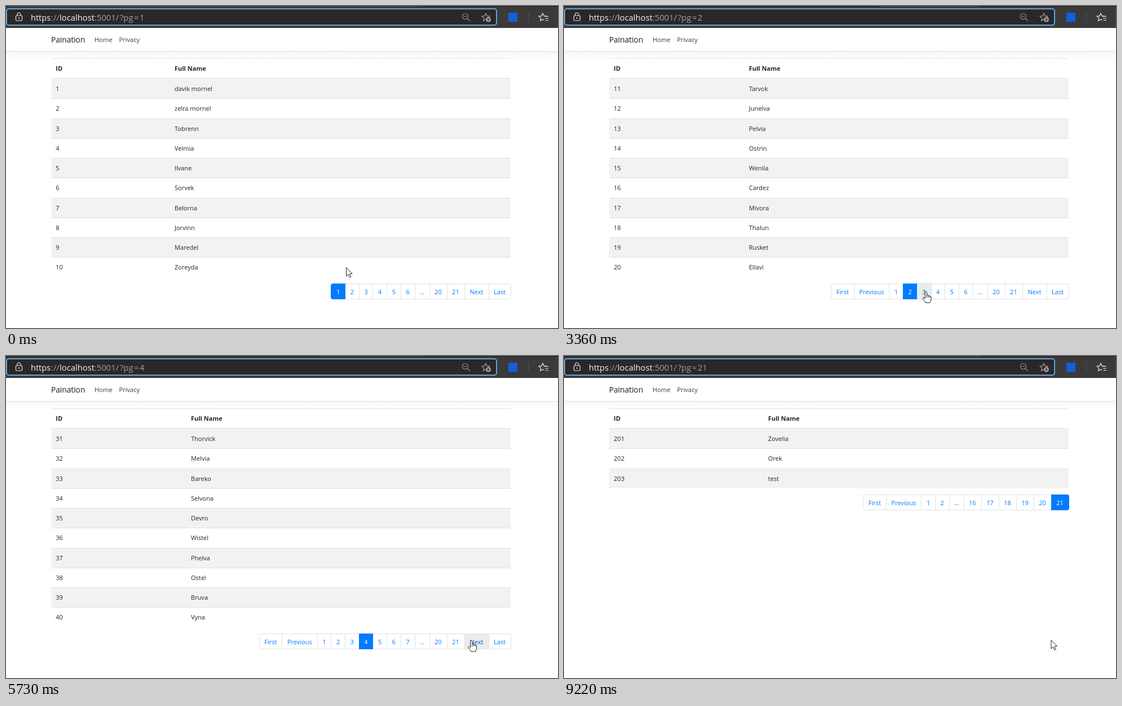
Animation, 979 px wide and 572 px high, one loop 9270 ms. Source, as an HTML page with a canvas:

```html
<!DOCTYPE html>
<html lang="en">
<head>
<meta charset="utf-8">
<title>Pagination</title>
<style>
html, body { margin: 0; width: 100%; height: 100%; overflow: hidden; background: #fff; }
canvas { display: block; }
</style>
</head>
<body>
<canvas id="stage" width="979" height="572"></canvas>
<script>
const ctx = document.getElementById('stage').getContext('2d');
const LOOP = 9270;
const FONT = '"Open Sans", "Noto Sans", sans-serif';
const LEFT = 80, RIGHT = 895, ROW = 35.27;
const BORDER = '#dee2e6', BLUE = '#007bff', INK = '#212529';

// load: content appears, wake: hover reacts again, click: link pressed, url: address of this page
const pages = [
  { no: 1, url: 0, load: 0, wake: 0, click: 1490, hit: '2', nameX: 299, first: 1,
    links: '1 2 3 4 5 6 ... 20 21 Next Last',
    names: 'davik mornel,zelra mornel,Tobrenn,Velmia,Ilvane,Sorvek,Belorna,Jorvinn,Maredel,Zoreyda' },
  { no: 2, url: 2520, load: 3010, wake: 3050, click: 3360, hit: '3', nameX: 328, first: 11,
    links: 'First Previous 1 2 3 4 5 6 ... 20 21 Next Last',
    names: 'Tarvok,Junelva,Pelvia,Ostrin,Wenlia,Cardez,Mivora,Thalun,Rusket,Ellavi' },
  { no: 3, url: 3700, load: 4030, wake: 4060, click: 4350, hit: '4', nameX: 328, first: 21,
    links: 'First Previous 1 2 3 4 5 6 ... 20 21 Next Last',
    names: 'Fovin,Tovrin,Corvanda,Neza,Vemor,Tulso,Uvo,Zeln,Pelun,Drusk' },
  { no: 4, url: 4540, load: 4810, wake: 4840, click: 6030, hit: 'Next', nameX: 328, first: 31,
    links: 'First Previous 1 2 3 4 5 6 7 ... 20 21 Next Last',
    names: 'Thorvick,Melvia,Bareko,Selvona,Devro,Wistel,Phelva,Ostel,Bruva,Vyna' },
  { no: 5, url: 6210, load: 6500, wake: 6640, click: 6960, hit: 'Next', nameX: 328, first: 41,
    links: 'First Previous 2 3 4 5 6 7 8 ... 20 21 Next Last',
    names: 'Torvian,Yelva,Keldorn,Faskell,Clusk,Ovessia,Garvex,Umelia,Bramox,Holvik' },
  { no: 6, url: 7290, load: 7570, wake: 7790, click: 8400, hit: 'Last', nameX: 318, first: 51,
    links: 'First Previous 1 2 ... 3 4 5 6 7 8 9 ... 20 21 Next Last',
    names: 'Teluna,Mastren,Velorn,Bartholvern,Jorem,Ulo,Maliva,Treff,Wivone,Tosel' },
  { no: 21, url: 8680, load: 8940, wake: 9120, click: Infinity, hit: '', nameX: 362, first: 201,
    links: 'First Previous 1 2 ... 16 17 18 19 20 21',
    names: 'Zovelia,Orek,test' }
];

// pointer path: time, x, y
const path = [
  [0, 603, 464], [400, 603, 464], [1110, 613, 500], [1920, 613, 500], [2200, 637, 504],
  [2350, 640, 506], [2769, 640, 506], [2770, 642, 507], [3420, 642, 507], [3750, 660, 507],
  [3889, 660, 507], [3890, 663, 507], [4030, 663, 507], [4250, 666.5, 507], [4840, 666.5, 507],
  [5360, 809, 506], [5570, 809, 506], [5730, 825.5, 505], [5830, 829, 505], [6640, 829, 505],
  [6730, 829.5, 506], [7790, 829.5, 506], [8020, 860.5, 506.5], [8220, 869, 505],
  [9120, 869, 505], [9220, 863.5, 504], [LOOP, 863.5, 504]
];

const arrowShape = new Path2D('M.5 .5V16L4 12.7L6.3 18L8.8 17L6.5 11.8L11 11.3Z');
const handShape = new Path2D('M-1.6 1.8C-1.6 0 1.6 0 1.6 1.8V7.2C2 6 4.4 6.3 4.4 8C5 7 7 7.3 7 9' +
  'C7.6 8.2 9 8.7 9 10.4V14C9 17 7.4 17.6 7.2 20H-1C-1.6 17.6-4.5 15-5.6 12.6C-6.2 11-4.2 10-3 11.4L-1.6 13Z');
const knuckles = new Path2D('M1.6 7V11M4.4 8V11M7 9V11');
const starShape = new Path2D('M0-7L2.1-2.4L7-1.9L3.3 1.4L4.4 6.3L0 3.8L-4.4 6.3L-3.3 1.4L-7-1.9L-2.1-2.4Z');

function text(str, x, y, size = 11, color = INK, weight = 400, align = 'left') {
  ctx.font = `${weight} ${size}px ${FONT}`;
  ctx.textAlign = align;
  ctx.fillStyle = color;
  ctx.fillText(str, x, y);
}

function rect(x, y, w, h, color) {
  ctx.fillStyle = color;
  ctx.fillRect(x, y, w, h);
}

function rounded(x, y, w, h, r) {
  ctx.beginPath();
  ctx.roundRect(x, y, w, h, r);
}

function icon(x, y, color, draw) {
  ctx.save();
  ctx.translate(x, y);
  ctx.strokeStyle = ctx.fillStyle = color;
  ctx.lineWidth = 1.2;
  ctx.beginPath();
  draw();
  ctx.restore();
}

function line(...pts) {
  for (let i = 0; i < pts.length; i += 4) {
    ctx.moveTo(pts[i], pts[i + 1]);
    ctx.lineTo(pts[i + 2], pts[i + 3]);
  }
}

function pointerAt(t) {
  const i = path.findIndex(k => k[0] > t);
  const [t0, x0, y0] = path[i - 1], [t1, x1, y1] = path[i];
  const f = (t - t0) / (t1 - t0);
  return { x: x0 + (x1 - x0) * f, y: y0 + (y1 - y0) * f };
}

function drawToolbar(t) {
  rect(0, 0, 979, 39, '#3b3a3b');
  if (t >= 30) {
    rect(0, 0, 560, 1, '#1c1b1c');
  }
  rect(738, 0, 241, 1, '#1c1b1c');
  rounded(1, 5, 869, 29, 4);
  ctx.fillStyle = '#2b2728';
  ctx.fill();
  ctx.strokeStyle = '#5ba7e0';
  ctx.lineWidth = 2;
  ctx.stroke();

  icon(23, 20, '#e8e8e8', () => {
    ctx.roundRect(-5.5, -3, 11, 9, 1.5);
    ctx.moveTo(-3, -3);
    ctx.lineTo(-3, -5);
    ctx.arc(0, -5, 3, Math.PI, 0);
    ctx.lineTo(3, -3);
    ctx.stroke();
    ctx.fillRect(-1, .5, 2, 2);
  });

  const no = pages.findLast(p => t >= p.url).no;
  const dim = '#a3a0a1', lit = '#f4f4f4';
  text('https', 44, 26, 14.6, lit);
  text('://', 80, 26, 14.8, dim);
  text('localhost', 95, 26, 14.8, lit);
  text(':5001/', 157, 26, 14.8, dim);
  text('?pg', 202, 26, 14.8, dim);
  text('=', 227, 26, 14.8, dim);
  text(no, 237, 26, 14.8, dim);

  icon(816, 20, '#8f8c8d', () => {
    ctx.arc(-1.5, -1.5, 5, 0, 7);
    line(2.2, 2.2, 7, 7, -4, -1.5, 1, -1.5);
    ctx.stroke();
  });
  icon(851, 20, '#a09d9e', () => {
    ctx.stroke(starShape);
    ctx.arc(4.5, 4, 4.5, 0, 7);
    ctx.fill();
    ctx.strokeStyle = '#2b2728';
    ctx.beginPath();
    line(2, 4, 7, 4, 4.5, 1.5, 4.5, 6.5);
    ctx.stroke();
  });
  rect(891, 12, 16, 16, '#175ddc');
  rect(926, 12, 1, 16, '#555354');
  icon(952, 20, '#e6e6e6', () => {
    ctx.stroke(starShape);
    ctx.fillStyle = '#3b3a3b';
    ctx.fillRect(2.5, -1.5, 8, 9);
    line(3, -1.5, 10, -1.5, 4, 2, 10, 2, 5, 5.5, 10, 5.5);
    ctx.stroke();
  });
}

function drawNav() {
  const shade = ctx.createLinearGradient(0, 81, 0, 95);
  shade.addColorStop(0, 'rgba(0,0,0,.035)');
  shade.addColorStop(1, 'rgba(0,0,0,0)');
  rect(0, 81, 979, 14, shade);
  rect(0, 80, 979, 1, BORDER);
  text('Paination', 80, 65, 13.7, '#1a1a1a');
  text('Home', 157, 64, 11.2, '#343a40');
  text('Privacy', 200.5, 64, 11.1, '#343a40');
}

function drawTable(page) {
  const w = RIGHT - LEFT;
  rect(LEFT, 93, w, 1, BORDER);
  text('ID', 88.3, 115, 11, INK, 700);
  text('Full Name', page.nameX, 115, 11, INK, 700);
  const names = page.names.split(',');
  const top = i => Math.round(129 + ROW * i);
  names.forEach((name, i) => {
    if (i % 2 === 0) rect(LEFT, top(i), w, top(i + 1) - top(i), '#f2f2f2');
    rect(LEFT, i ? top(i) : 128, w, 1, BORDER);
    const y = Math.round(151 + ROW * i);
    text(page.first + i, 88.3, y);
    text(name, page.nameX, y);
  });
  return top(names.length) + 11;
}

function layout(page) {
  const fixed = { First: 40.5, Previous: 62.4, Next: 43, Last: 39.2, '...': 26 };
  let x = RIGHT - .2;
  return page.links.split(' ').reverse().map(label => {
    const w = fixed[label] || 18.4 + 6.3 * label.length;
    x -= w;
    return { label, x, w };
  }).reverse();
}

function drawPager(page, y, t, pointer) {
  const cells = layout(page);
  const loading = t >= page.click;
  const inside = c => pointer.y >= y && pointer.y < y + 28 && pointer.x >= c.x && pointer.x < c.x + c.w;
  const isHot = c => loading ? c.label === page.hit : t >= page.wake && inside(c);
  const isActive = c => c.label === String(page.no);

  const drawCell = (c, i) => {
    const x0 = Math.round(c.x), x1 = Math.round(c.x + c.w);
    const l = i === 0 ? 3 : 0, r = i === cells.length - 1 ? 3 : 0;
    const active = isActive(c), hot = isHot(c);
    rounded(x0 + .5, y + .5, x1 - x0, 27, [l, r, r, l]);
    ctx.fillStyle = active ? BLUE : hot ? '#e9ecef' : '#fff';
    ctx.fill();
    ctx.lineWidth = 1;
    ctx.strokeStyle = active ? BLUE : BORDER;
    ctx.stroke();
    if (hot && loading) {
      const a = .25 * Math.min(1, .3 + (t - page.click) / 100);
      rounded(x0 - 1.2, y - 1.2, x1 - x0 + 3.4, 30.4, 1);
      ctx.lineWidth = 2.4;
      ctx.strokeStyle = `rgba(0,123,255,${a})`;
      ctx.stroke();
    }
    text(c.label, c.x + c.w / 2 + .3, y + 19, 11, active ? '#fff' : hot ? '#0056b3' : BLUE, 400, 'center');
  };

  const rank = c => isHot(c) ? 2 : isActive(c) ? 1 : 0;
  [0, 1, 2].forEach(k => cells.forEach((c, i) => rank(c) === k && drawCell(c, i)));
}

function drawPointer({ x, y }, hand) {
  ctx.save();
  ctx.translate(x, y);
  ctx.lineJoin = 'round';
  ctx.lineWidth = 1;
  ctx.fillStyle = '#fff';
  ctx.strokeStyle = '#222';
  const shape = hand ? handShape : arrowShape;
  ctx.fill(shape);
  ctx.stroke(shape);
  if (hand) ctx.stroke(knuckles);
  ctx.restore();
}

function frame(now) {
  const t = now % LOOP;
  const page = pages.findLast(p => t >= p.load);
  const pointer = pointerAt(t);
  rect(0, 0, 979, 572, '#fff');
  drawNav();
  drawToolbar(t);
  const y = drawTable(page);
  drawPager(page, y, t, pointer);
  drawPointer(pointer, pointer.y >= 493 && t < 9120);
  requestAnimationFrame(frame);
}

const start = performance.now();
const tick = () => frame(Math.max(0, performance.now() - start));
const loop = () => { tick(); };
frame = (draw => () => draw(Math.max(0, performance.now() - start)))(frame);
loop();
</script>
</body>
</html>
```
